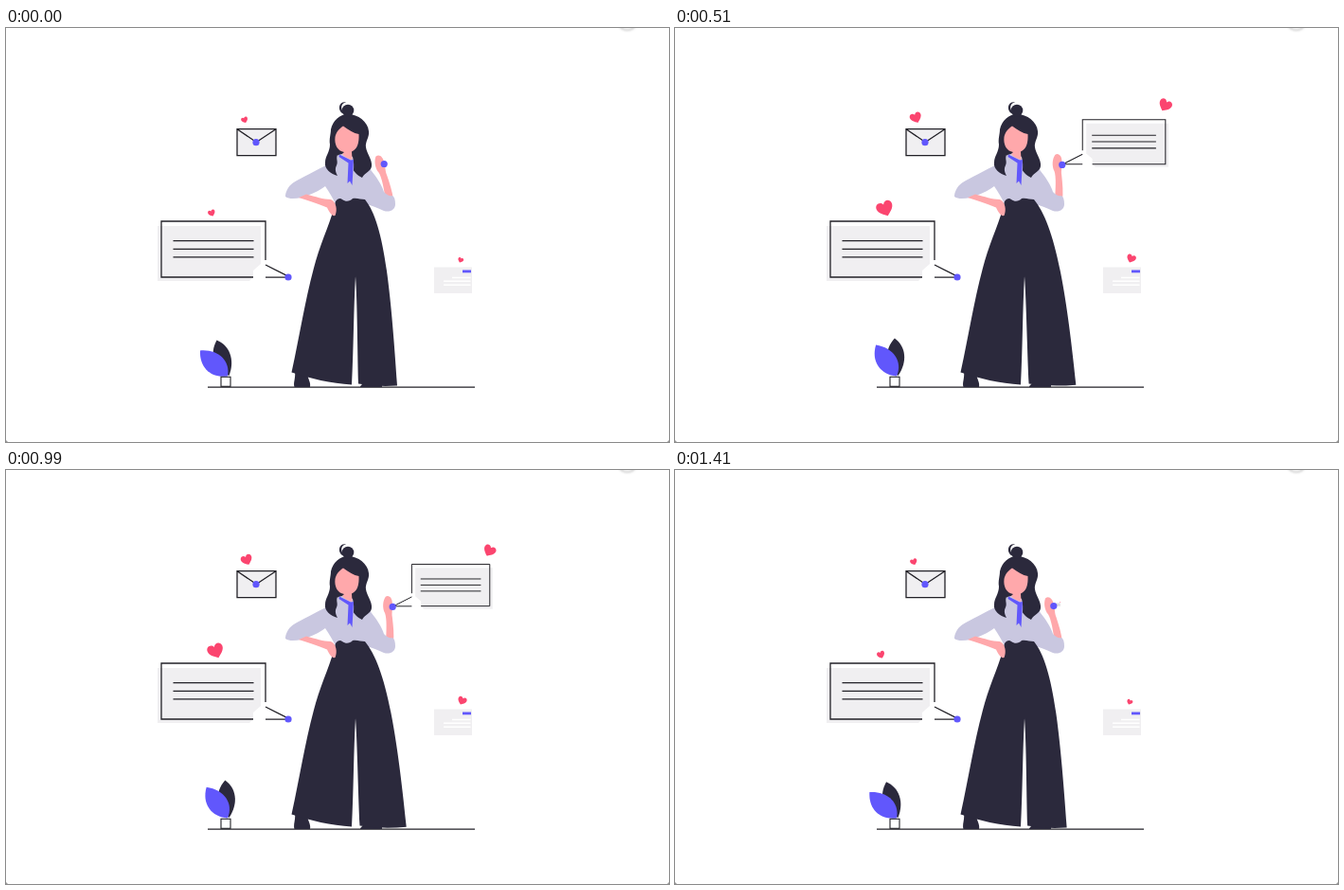
An HTML page that plays this animation: 700 by 437 pixels, repeating every 1440 ms.

```html
<!DOCTYPE html>
<html lang="en">
<head>
<meta charset="utf-8">
<title>Messages</title>
<style>
  html, body { margin: 0; width: 100%; height: 100%; overflow: hidden; background: #fff; }
  svg { display: block; width: 100vw; height: 100vh; }
  .ink { fill: #2b293c; }
  .skin { fill: #ffa8ab; }
  .shirt { fill: #c9c7e0; }
  .violet { fill: #6157fc; }
  .pale { fill: #f0eff1; }
  .love { fill: #fb456f; }
  .line { fill: none; stroke: #222127; stroke-width: 1.3; }
</style>
</head>
<body>
<svg viewBox="0 0 700 437">
  <defs>
    <!-- unit heart, anchored at its centre -->
    <path id="heart" d="M0 .5C-.2 .34-.54 .14-.54-.16C-.54-.5-.14-.58 0-.28C.14-.58 .54-.5 .54-.16C.54 .14 .2 .34 0 .5Z"/>
    <g id="bubble">
      <path class="pale" d="M160 209H269V249L261 256V263L257 267H160Z"/>
      <path class="line" d="M274 245V204H164V263H261M274 250L300 263.2H274"/>
      <path class="line" d="M176.500 224.700H261.500M176.500 233.300H261.500M176.500 241.900H261.500"/>
    </g>
    <filter id="soft" x="-30%" y="-30%" width="160%" height="160%"><feGaussianBlur stdDeviation=".8"/></filter>
  </defs>

  <circle cx="656" cy="-8" r="10" fill="#fff" stroke="#c4c4c4" stroke-width="1.600" filter="url(#soft)"/>
  <path fill="#999" d="M0 435L2 437H0ZM700 435L698 437H700Z"/>

  <!-- envelope -->
  <rect class="pale" x="244" y="107" width="41" height="28"/>
  <path class="line" d="M244 106.700H285V134.700H244ZL264.300 120.500L285 106.700"/>
  <circle class="violet" cx="264" cy="120.700" r="3.600"/>

  <use href="#bubble"/>
  <circle class="violet" cx="298" cy="263" r="3.600"/>

  <!-- card -->
  <rect class="pale" x="452" y="252.500" width="40" height="27.500"/>
  <rect class="violet" x="482" y="255.500" width="9" height="2.800"/>
  <path stroke="#fff" stroke-width="1.500" d="M471 263.500H490.500M462 267.300H490.500M462 271.200H490.500"/>

  <!-- plant -->
  <path id="leafB" class="ink" d="M222.500 329.500C236 335 242 350 235.500 367C220 360 214 345 222.500 329.500Z"/>
  <path id="leafA" class="violet" d="M205 340.500C224 339 237 351 234 367.500C217 370 204 359 205 340.500Z"/>
  <rect class="line" x="227" y="368.300" width="10" height="10" style="fill:#fff;stroke-width:1.100"/>

  <path class="line" d="M213 379.200H495"/>

  <!-- figure -->
  <path class="ink" d="M305 362L318 365C319 371 322 374 321 379H304.500C303 374 306 370 305 362Z"/>
  <path class="ink" d="M378 373H397V379H374C374 377 377 376 378 373Z"/>
  <path id="arm" class="skin" d="M390.500 135.500C394 132.500 398 136 399 141C401 147 400 150 402 155C405 164 408 172 409 182H401C399 170 397 158 393.500 152.500C389.500 148 388.500 140 390.500 135.500Z"/>
  <path class="shirt" d="M351 134C346 137 345 141 341 143.500C328 150 312 158 303 163.500C298 167 295 173 295 178C299 181 306 180 312 179C321 176 331 172 337 167C341 173 345 179 348 186H379C386 187 392 190 399 193C405 195 411 192 411 186C411 181 410 178 408 177C405 178 402 176 399 173C397 166 391 157 386 151C382 145 375 138 366 135Z"/>
  <path id="skirt" class="ink"/>
  <path class="skin" d="M309 179L317 175.500C327 178 335 181 343 181C349 184 350 192 347.500 198C344 199 341 194 339 189.500C329 185 318 182 309 179Z"/>

  <!-- head -->
  <path class="ink" d="M361 91C372 91 382 99 383 109C384 115 379 120 380 126C381 133 387 139 386 146C385 152 379 152 376 158C371 156 367 151 364 146L350 134C348 138 351 141 349 145C347 149 348 152 350 156C342 154 336 148 337 142C337 135 342 131 342 123C341 117 343 112 343 107C345 98 352 91 361 91Z"/>
  <circle class="ink" cx="361" cy="87" r="6.300"/>
  <path class="ink" d="M355.500 90.500C349 86 352 77 359 78.500C354 79 352.500 85 356.500 89Z"/>
  <path class="shirt" d="M351 134L358 132L366 136C368 144 367 150 366 156L355 152C352 146 351 141 351 134Z"/>
  <path class="skin" d="M356 103.500C362 108 367 111 372.500 112C373 121 371 128 365 130.500L365.500 139C361 138 357 136 355 133L357 131C350 130 346.500 123 347.500 115C348.500 110 352 106 356 103.500Z"/>
  <path class="violet" d="M352 133.500L364 139.500L367 139L365.500 166L363 161.500L360.500 164L361.500 142.500L351.500 136Z"/>

  <g id="talk">
    <use href="#bubble" transform="translate(301 -264) scale(-1 1)"/>
    <use href="#heart" class="love" transform="translate(136.500 -79) rotate(28) scale(16)"/>
  </g>
  <circle id="dot" class="violet" r="3.600"/>
  <use id="h0" href="#heart" class="love"/>
  <use id="h1" href="#heart" class="love"/>
  <use id="h2" href="#heart" class="love"/>
</svg>
<script>
const LOOP = 1440, PEAK = 742, ROUND = 0.21;
const el = id => document.getElementById(id);
const move = (id, value) => el(id).setAttribute('transform', value);
const mix = (a, b, s) => a + (b - a) * s;

// lower-left anchor, smallest and largest size, tilt
const hearts = [
  [248.7, 100.3, 6.5, 12.5, -22],
  [213.7, 198.8, 7, 18.5, -22],
  [477.2, 247.8, 5.5, 9.8, 22]
];

// straight rise and fall with a rounded top, 0 to 1 to 0
function swell(t) {
  const d = t < PEAK ? (PEAK - t) / PEAK : (t - PEAK) / (LOOP - PEAK);
  const top = Math.hypot(1, ROUND);
  return (top - Math.hypot(d, ROUND)) / (top - ROUND);
}

function skirt(s) {
  return 'M348 183C350 180 353 179 355 181C359 184 363 183 366 180C370 179 375 181 379 181' +
    `C${398 + s} 205 ${405 + 8 * s} 260 ${413 + 13 * s} ${377.5 - s}` +
    `Q${392 + 6 * s} 379 ${372 + 2 * s} 375.5` +
    `C${371 + s} 340 371 290 369 262C367 295 367 340 365 376.5` +
    'C343 375 321 370 301.5 363.5C311 320 316 285 327 246C334 222 344 202 348 183Z';
}

function draw(t) {
  const s = swell(t);
  const x = mix(399.2, 411.2, s), y = mix(143.5, 144.7, s);
  move('talk', `translate(${x} ${y}) scale(${s})`);
  move('dot', `translate(${x} ${y})`);
  move('arm', `rotate(${16.5 * s} 404 182)`);
  move('leafA', `rotate(${17 * s} 234 367.5)`);
  move('leafB', `rotate(${17.5 * s} 235.5 367)`);
  el('skirt').setAttribute('d', skirt(s));
  hearts.forEach(([hx, hy, min, max, tilt], i) => {
    const size = mix(min, max, s);
    move('h' + i, `translate(${hx + size / 2} ${hy - size / 2}) rotate(${tilt}) scale(${size})`);
  });
}

const start = performance.now();
function tick() {
  draw((performance.now() - start) % LOOP);
  requestAnimationFrame(tick);
}
draw(0);
requestAnimationFrame(tick);
</script>
</body>
</html>
```
